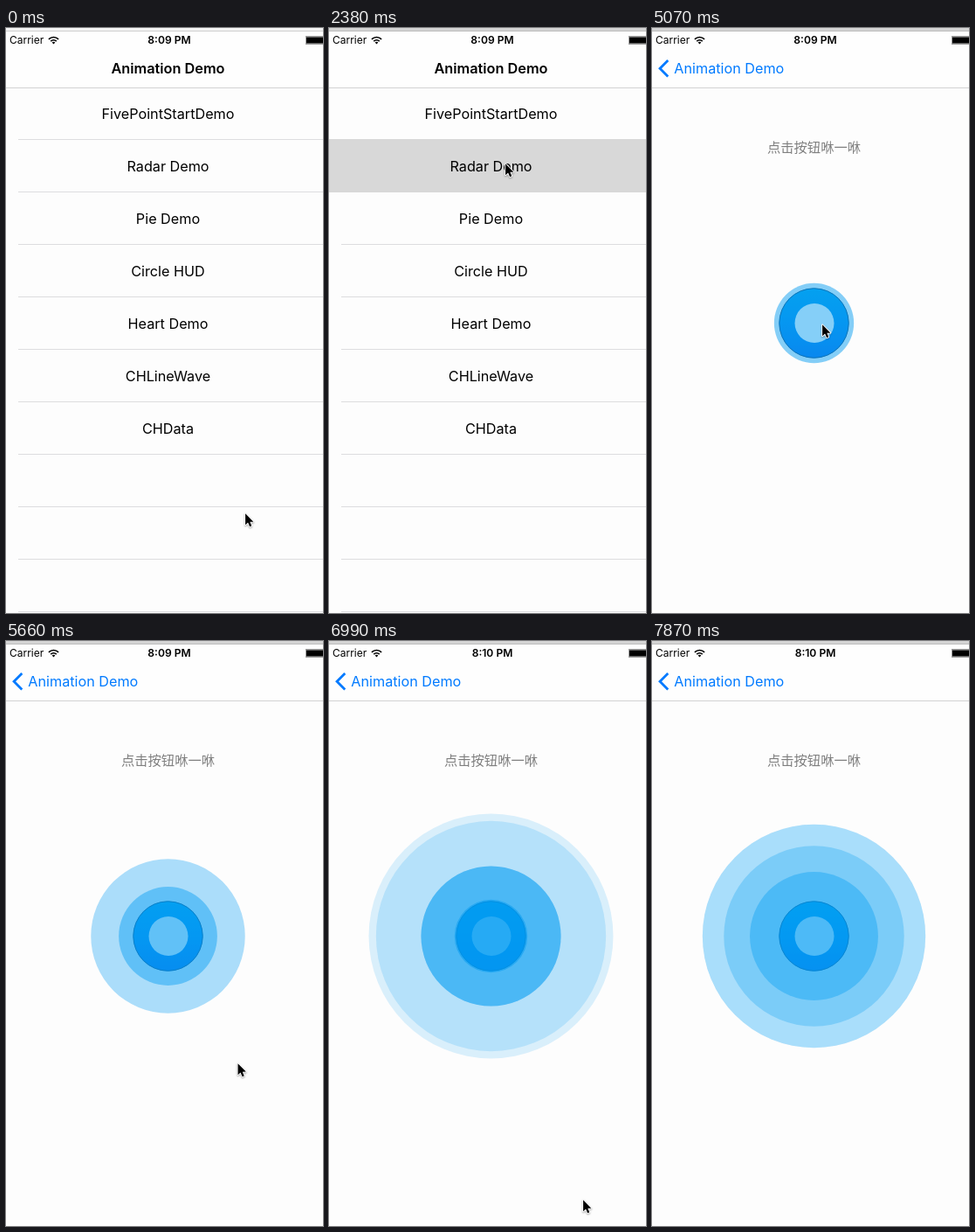
Write an HTML page with a canvas that moves like this. It is 363 px wide and 669 px high and loops after 8 s.

```html
<!DOCTYPE html>
<html lang="en">
<head>
<meta charset="utf-8">
<title>Animation Demo</title>
<style>
html, body { margin: 0; width: 100%; height: 100%; overflow: hidden; background: #fdfdfd; }
canvas { display: block; width: 363px; height: 669px; }
</style>
</head>
<body>
<canvas id="stage"></canvas>
<script>
const W = 363, H = 669, LOOP = 8000;
const SCREEN = 371, MID = 185.5;
const SANS = 'Inter, Roboto, sans-serif';
const CJK = '"Noto Sans CJK SC", "Noto Sans CJK", "Noto Sans CJK JP", sans-serif';
const PAGE = '#fdfdfd', BAR = '#fefefe', BLUE = '#007aff';
const ROWS = ['FivePointStartDemo', 'Radar Demo', 'Pie Demo', 'Circle HUD',
              'Heart Demo', 'CHLineWave', 'CHData'];

const FOCUS = 2215, PRESS = 2365, PUSH = 2900, MINUTE = 6400;
const RIPPLE_MS = 2000;
const RIPPLES = [5000, 5453, 6450, 6450, 6962, 7430];

// Pointer path: time, x, y
const POINTER = [
  [0, 273.5, 554.5], [270, 273.5, 554.5], [280, 274.5, 554.5], [730, 274.5, 554.5],
  [877, 272, 540], [1026, 258, 470], [1176, 236, 350], [1325, 210, 200],
  [1470, 201.5, 154.5], [3418, 201.5, 154.5], [3866, 198.5, 353],
  [4015, 196, 343], [4160, 194.5, 338.5], [5070, 194.5, 338.5],
  [5215, 200, 350], [5510, 245, 440], [5805, 285, 525], [6100, 270, 545],
  [6246, 253.5, 554.5], [6690, 278, 600], [6983, 290.5, 638.5],
  [7425, 300, 654], [7570, 305, 690], [8000, 305, 700]
];

const canvas = document.getElementById('stage');
const dpr = window.devicePixelRatio || 1;
canvas.width = W * dpr;
canvas.height = H * dpr;
const g = canvas.getContext('2d');

const mix = (a, b, p) => a + (b - a) * p;

function easeOut(x) {
  let lo = 0, hi = 1, s = x;
  for (let i = 0; i < 24; i++) {
    s = (lo + hi) / 2;
    if (1.74 * s * s * (1 - s) + s * s * s < x) lo = s; else hi = s;
  }
  return s * s * (3 - 2 * s);
}

// The screen refreshes about seven times a second
function tick(t) {
  const [from, step] = t < 280 ? [0, 280] : t < 5068 ? [280, 149.4] : [5068, 147.3];
  return from + Math.floor((t - from) / step) * step;
}

function pushAmount(t) {
  if (t <= PUSH) return 0;
  const x = (t - PUSH) / 50;
  return t > 3400 ? 1 : 1 - (1 + x) * Math.exp(-x);
}

function rect(x, y, w, h, color) {
  g.fillStyle = color;
  g.fillRect(x, y, w, h);
}

function disc(x, y, r, color) {
  g.fillStyle = color;
  g.beginPath();
  g.arc(x, y, r, 0, Math.PI * 2);
  g.fill();
}

function text(str, x, y, font, color, align = 'center') {
  g.font = font;
  g.fillStyle = color;
  g.textAlign = align;
  g.fillText(str, x, y);
}

function drawList(t, dx) {
  g.save();
  g.translate(dx, 0);
  rect(0, 69, SCREEN, H, PAGE);
  for (let y = 127; y < H; y += 60) rect(14, y, SCREEN, 1, '#dddddf');
  if (t >= PRESS) rect(0, 127, SCREEN, 61, '#d8d8d8');
  ROWS.forEach((name, i) => text(name, MID, 103.5 + i * 60, `400 16.2px ${SANS}`, '#000'));
  g.restore();
}

function drawButton() {
  const fill = g.createLinearGradient(0, 298, 0, 377);
  fill.addColorStop(0, '#08a5ee');
  fill.addColorStop(0.5, '#0a92f0');
  fill.addColorStop(1, '#1176ec');
  disc(MID, 337.5, 40, fill);
  g.strokeStyle = '#1d5080';
  g.lineWidth = 1;
  g.beginPath();
  g.arc(MID, 337.5, 39.7, 0, Math.PI * 2);
  g.stroke();
  disc(MID + 0.5, 337.5, 22.5, '#fff');
}

function drawRipples(t) {
  for (const start of RIPPLES) {
    const x = (t - start) / RIPPLE_MS;
    if (x < 0 || x >= 1) continue;
    const p = easeOut(x);
    disc(MID, 337.5, mix(40, 140, p), `rgba(0,155,241,${mix(0.5, 0.14, p)})`);
  }
}

function drawRadar(t, dx) {
  g.save();
  g.translate(dx, 0);
  rect(0, 69, SCREEN, H, PAGE);
  text('点击按钮咻一咻', MID, 141.5, `400 15.3px ${CJK}`, '#7f7f7f');
  drawButton();
  drawRipples(t);
  g.restore();
}

function drawNav(p) {
  rect(0, 0, W, 68, BAR);
  rect(0, 68, W, 1, '#d2d2d3');
  const x = mix(MID, 88.3, p);
  g.globalAlpha = 1 - p;
  text('Animation Demo', x, 52, `600 16.3px ${SANS}`, '#000');
  g.globalAlpha = p;
  text('Animation Demo', x, 52, `400 16.2px ${SANS}`, BLUE);
  g.strokeStyle = BLUE;
  g.lineWidth = 2.8;
  g.beginPath();
  g.moveTo(18.3, 37);
  g.lineTo(9.1, 46.2);
  g.lineTo(18.3, 55.4);
  g.stroke();
  g.globalAlpha = 1;
}

function drawWifi(x, y) {
  g.strokeStyle = '#000';
  g.lineWidth = 1.7;
  for (const r of [4.6, 7.9]) {
    g.beginPath();
    g.arc(x, y, r, -Math.PI * 0.75, -Math.PI * 0.25);
    g.stroke();
  }
  g.fillStyle = '#000';
  g.beginPath();
  g.moveTo(x, y);
  g.arc(x, y, 2.6, -Math.PI * 0.75, -Math.PI * 0.25);
  g.fill();
}

function drawStatus(t) {
  const active = t >= FOCUS;
  rect(0, 0, W, 3, active ? '#d4d4d4' : '#f4f4f4');
  rect(0, 3, W, 1, active ? '#bcbcbc' : '#d0d0d0');
  text('Carrier', 4, 18, `400 12px ${SANS}`, '#000', 'left');
  drawWifi(54.5, 18.4);
  text(t < MINUTE ? '8:09 PM' : '8:10 PM', 187, 18, `600 12.1px ${SANS}`, '#000');
  g.strokeStyle = '#999';
  g.lineWidth = 1;
  g.strokeRect(343.5, 9.5, 24, 9);
  rect(344, 10.4, 22, 7.2, '#000');
}

function drawPointer(t) {
  const i = POINTER.findIndex(k => k[0] > t);
  const a = POINTER[i - 1], b = POINTER[i];
  const p = (t - a[0]) / (b[0] - a[0]);
  g.save();
  g.translate(mix(a[1], b[1], p) + 0.6, mix(a[2], b[2], p) + 0.8);
  g.scale(0.9, 0.9);
  g.beginPath();
  g.moveTo(0, 0);
  g.lineTo(0, 14.4);
  g.lineTo(3.3, 11.4);
  g.lineTo(5.6, 16.6);
  g.lineTo(8, 15.6);
  g.lineTo(5.8, 10.6);
  g.lineTo(10.3, 10.4);
  g.closePath();
  g.lineJoin = 'round';
  g.shadowColor = 'rgba(0,0,0,0.35)';
  g.shadowBlur = 2 * dpr;
  g.shadowOffsetY = dpr;
  g.strokeStyle = '#fff';
  g.lineWidth = 2;
  g.stroke();
  g.shadowColor = 'transparent';
  g.fillStyle = '#000';
  g.fill();
  g.restore();
}

function draw(time) {
  const t = tick(time);
  const p = pushAmount(t);
  const dx = SCREEN * (1 - p);
  g.setTransform(dpr, 0, 0, dpr, 0, 0);
  rect(0, 0, W, H, PAGE);
  if (dx > 3) {
    drawList(t, -0.3 * SCREEN * p);
    rect(0, 69, dx, H, `rgba(0,0,0,${0.1 * p})`);
  }
  if (p > 0) drawRadar(t, dx);
  drawNav(p);
  drawStatus(t);
  drawPointer(t);
}

const begin = performance.now();
function frame() {
  draw((performance.now() - begin) % LOOP);
  requestAnimationFrame(frame);
}
frame();
</script>
</body>
</html>
```
